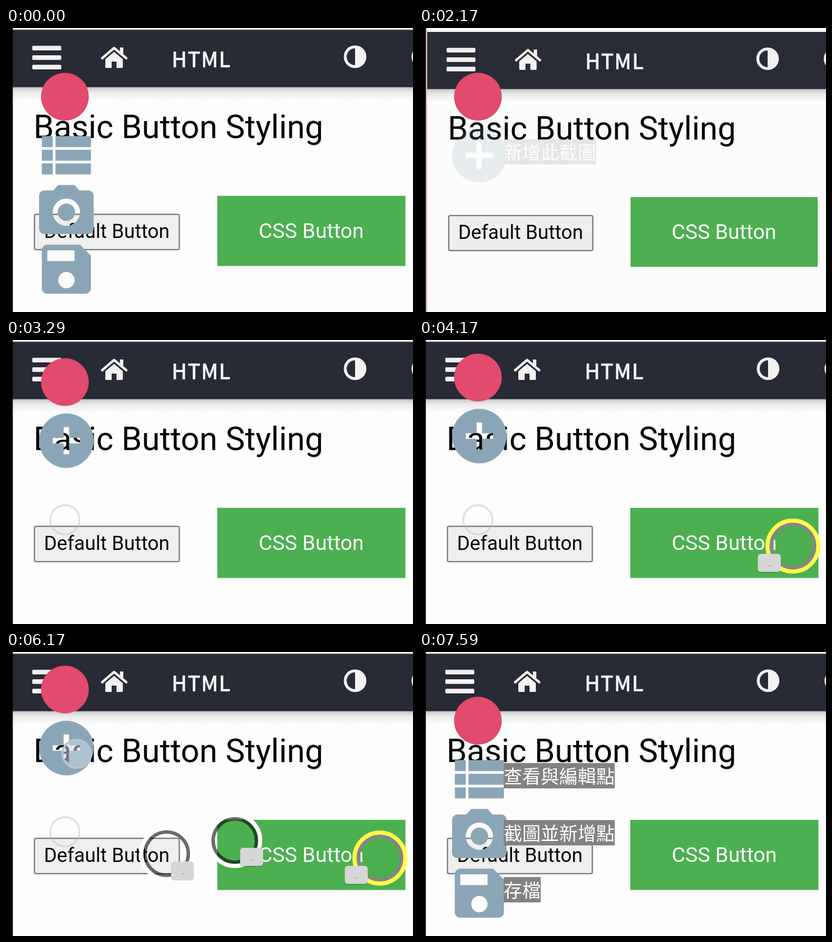
An HTML page that plays this animation: 836x583 px, repeating every 7.64 s.

```html
<!DOCTYPE html>
<html lang="zh-Hant">
<head>
<meta charset="utf-8">
<title>Button macro demo</title>
<style>
  html, body { margin: 0; width: 100%; height: 100%; overflow: hidden; background: #fdfdfd; }
  svg { display: block; width: 100vw; height: 100vh; }
  .roboto { font-family: Roboto, sans-serif; }
  .nav {
    font: 42.5px "Noto Sans CJK TC", "Noto Sans CJK SC", "Noto Sans CJK JP", "Noto Sans", sans-serif;
    letter-spacing: 2px; stroke: #f2f2f2; stroke-width: 1.3px;
  }
  .tip { font: 38px "Noto Sans CJK TC", "Noto Sans CJK SC", "Noto Sans CJK JP", "Noto Sans CJK", sans-serif; fill: #fff; }
</style>
</head>
<body>
<svg viewBox="0 0 836 583" preserveAspectRatio="none">
  <defs>
    <linearGradient id="shade" x2="0" y2="1">
      <stop offset="0" stop-color="#c2c2c2"/>
      <stop offset=".35" stop-color="#e9e9e9"/>
      <stop offset="1" stop-color="#fdfdfd"/>
    </linearGradient>
  </defs>

  <rect id="backdrop" width="836" height="583"/>

  <g id="page">
    <rect x="14" y="-90" width="900" height="760" fill="#fdfdfd"/>
    <g>
      <rect x="146" y="-90" width="664" height="72" rx="36" fill="#eef0f0"/>
      <rect x="63" y="-76" width="31" height="28" rx="5" fill="none" stroke="#505050" stroke-width="5"/>
      <path d="M199-52h22" stroke="#a8b8d8" stroke-width="4"/>
      <path d="M738-53h16" stroke="#505050" stroke-width="3"/>
    </g>
    <rect x="14" y="121" width="900" height="28" fill="url(#shade)"/>
    <rect x="14" y="3.500" width="900" height="118" fill="#282a35"/>
    <g fill="#f2f2f2">
      <rect x="54" y="36.500" width="59.500" height="9.500" rx="2"/>
      <rect x="54" y="56" width="59.500" height="9.500" rx="2"/>
      <rect x="54" y="75.500" width="59.500" height="9.500" rx="2"/>
      <path d="M197.500 62L222 41L247 62" fill="none" stroke="#f2f2f2" stroke-width="5" stroke-linecap="round" stroke-linejoin="round"/>
      <path d="M234 40h7v14l-7-6zM204 64l18-15 18 15v16q0 2-2 2h-11v-13h-10v13h-11q-2 0-2-2z"/>
      <text class="nav" x="340.500" y="80">HTML</text>
      <circle cx="717" cy="59" r="20.200" fill="none" stroke="#f2f2f2" stroke-width="6"/>
      <path d="M717 39a20 20 0 0 1 0 40z"/>
      <circle cx="856" cy="59" r="23"/>
      <path fill="#282a35" d="M839 48l9-8 9 2-3 8-7 3 1 7-8-3zM850 60l9 4-3 9-6 4-2-9z"/>
    </g>
    <g class="roboto">
      <text x="56.500" y="226" font-size="67" fill="#060606">Basic Button Styling</text>
      <rect x="58.500" y="382.500" width="297.500" height="72.500" rx="3" fill="#efefef" stroke="#767676" stroke-width="2.500"/>
      <text x="78" y="431" font-size="40.400" fill="#060606">Default Button</text>
      <rect x="434" y="344.500" width="386.500" height="144" fill="#4caf50"/>
      <text x="627" y="431" font-size="43" fill="#fff" text-anchor="middle">CSS Button</text>
    </g>
    <circle id="trace" cx="121" cy="369" r="30" fill="none" stroke="#b4bcd4" stroke-opacity=".45" stroke-width="4"/>
  </g>

  <rect width="14" height="583"/>
  <g id="markers"></g>

  <g id="panel">
    <g id="menu" fill="#8aa6b6"></g>
    <g id="add" fill="#8aa6b6"></g>
    <circle cx="121" cy="141" r="49" fill="#e24a6e"/>
  </g>
  <circle id="touch" r="29" fill="#ccd8e2" fill-opacity=".55" stroke="#b8c4d4" stroke-width="4"/>
</svg>

<script>
const LOOP = 7640;
const $ = id => document.getElementById(id);
const clamp = v => Math.max(0, Math.min(1, v));
const ramp = (t, start, length) => clamp((t - start) / length);
const smooth = p => p * p * (3 - 2 * p);
const pulse = (t, start, end, fade) => ramp(t, start, fade) * (1 - ramp(t, end - fade, fade));
const mix = (a, b, p) => `rgb(${a.map((v, i) => Math.round(v + (b[i] - v) * p))})`;

// Icons use a 24-unit grid.
const icons = {
  list: "M3 5h4v4H3zM8 5h13v4H8zM3 10h4v4H3zM8 10h13v4H8zM3 15h4v4H3zM8 15h13v4H8z",
  camera: "M9 2L7.2 4H4a2 2 0 0 0-2 2v12a2 2 0 0 0 2 2h16a2 2 0 0 0 2-2V6a2 2 0 0 0-2-2h-3.200L15 2zM7 12a5 5 0 0 1 10 0a5 5 0 0 1-10 0zM8.800 12a3.200 3.200 0 0 0 6.400 0a3.200 3.200 0 0 0-6.400 0z",
  save: "M17 3H5a2 2 0 0 0-2 2v14a2 2 0 0 0 2 2h14a2 2 0 0 0 2-2V7zM9 16a3 3 0 0 1 6 0a3 3 0 0 1-6 0zM5 5h10v4H5z",
  plus: "M2 12a10 10 0 0 1 20 0a10 10 0 0 1-20 0zM11 7v4H7v2h4v4h2v-4h4v-2h-4V7z"
};

const icon = (name, row) =>
  `<path d="${icons[name]}" fill-rule="evenodd" transform="translate(56.8 ${194 + row * 117}) scale(5.6)"/>`;
const tip = (label, row) => `<g transform="translate(174 ${228 + row * 117})">
  <rect width="${label.length * 38}" height="52" fill="#828282"/>
  <text class="tip" y="41">${label}</text></g>`;

$("menu").innerHTML = ["list", "camera", "save"].map(icon).join("") +
  `<g id="tips">${["查看與編輯點", "截圖並新增點", "存檔"].map(tip).join("")}</g>`;
$("add").innerHTML = icon("plus", 0) + `<g id="addTip">${tip("新增此截圖", 0)}</g>`;

const markers = [
  { x: 768, y: 423, dx: -72, dy: 16, at: 3900, active: true },
  { x: 470, y: 387, dx: 11, dy: 15, at: 4850 },
  { x: 330, y: 414, dx: 9, dy: 16, at: 5700 }
];
$("markers").innerHTML = markers.map(m => `<g transform="translate(${m.x} ${m.y})" fill="none">
  <circle r="52" stroke="${m.active ? "#ffff48" : "#fff"}" stroke-width="9"/>
  <circle r="44.500" stroke="${m.active ? "#858585" : "#000"}" stroke-opacity="${m.active ? 1 : .58}" stroke-width="7"/>
  <rect x="${m.dx}" y="${m.dy + 2}" width="47" height="37" rx="6" fill="#000" fill-opacity=".15"/>
  <rect x="${m.dx}" y="${m.dy}" width="47" height="37" rx="6" fill="#d6d6d6"/>
  <text class="roboto" x="${m.dx + 24}" y="${m.dy + 26}" font-size="14" fill="#202020" text-anchor="middle">.</text>
</g>`).join("");
const markerNodes = [...$("markers").children];

const touches = [
  { x: 121, y: 369, from: 1000, to: 1300 },
  ...[3650, 4600, 5450, 6070].map(from => ({ x: 145, y: 209, from, to: from + 230 }))
];

const show = (id, opacity) => $(id).setAttribute("opacity", opacity);

function draw(t) {
  // The screenshot shrinks and turns slightly sheer while its pivot rises.
  const zoom = smooth(ramp(t, 2125, 300)) * (1 - smooth(ramp(t, 2780, 420)));
  const pivot = 850 - 285 * zoom;
  $("page").setAttribute("transform",
    `translate(539 ${pivot}) scale(${1 - .0855 * zoom}) translate(-539 ${-pivot})`);
  show("page", 1 - .13 * zoom);
  $("backdrop").setAttribute("fill", mix([232, 178, 182], [207, 207, 207], ramp(t, 2170, 150)));
  show("trace", ramp(t, 2300, 150) * (1 - ramp(t, 6500, 150)));

  const closing = 1 - ramp(t, 6450, 150);
  show("menu", t < 3000 ? 1 - ramp(t, 1300, 200) : ramp(t, 6600, 200));
  show("tips", t > 6000 ? 1 : 0);
  show("add", ramp(t, 2135, 200) * closing);
  show("addTip", 1 - ramp(t, 3100, 150));
  const lift = 64 * smooth(ramp(t, 3200, 120)) * (1 - smooth(ramp(t, 6500, 120)));
  $("panel").setAttribute("transform", `translate(0 ${-lift})`);

  markers.forEach((m, i) => markerNodes[i].setAttribute("opacity", ramp(t, m.at, 80) * closing));

  const touch = touches.find(p => t >= p.from && t <= p.to);
  show("touch", touch ? pulse(t, touch.from, touch.to, 70) : 0);
  if (touch) {
    $("touch").setAttribute("cx", touch.x);
    $("touch").setAttribute("cy", touch.y);
  }
}

const start = performance.now();
function tick() {
  draw((performance.now() - start) % LOOP);
  requestAnimationFrame(tick);
}
tick();
</script>
</body>
</html>
```
